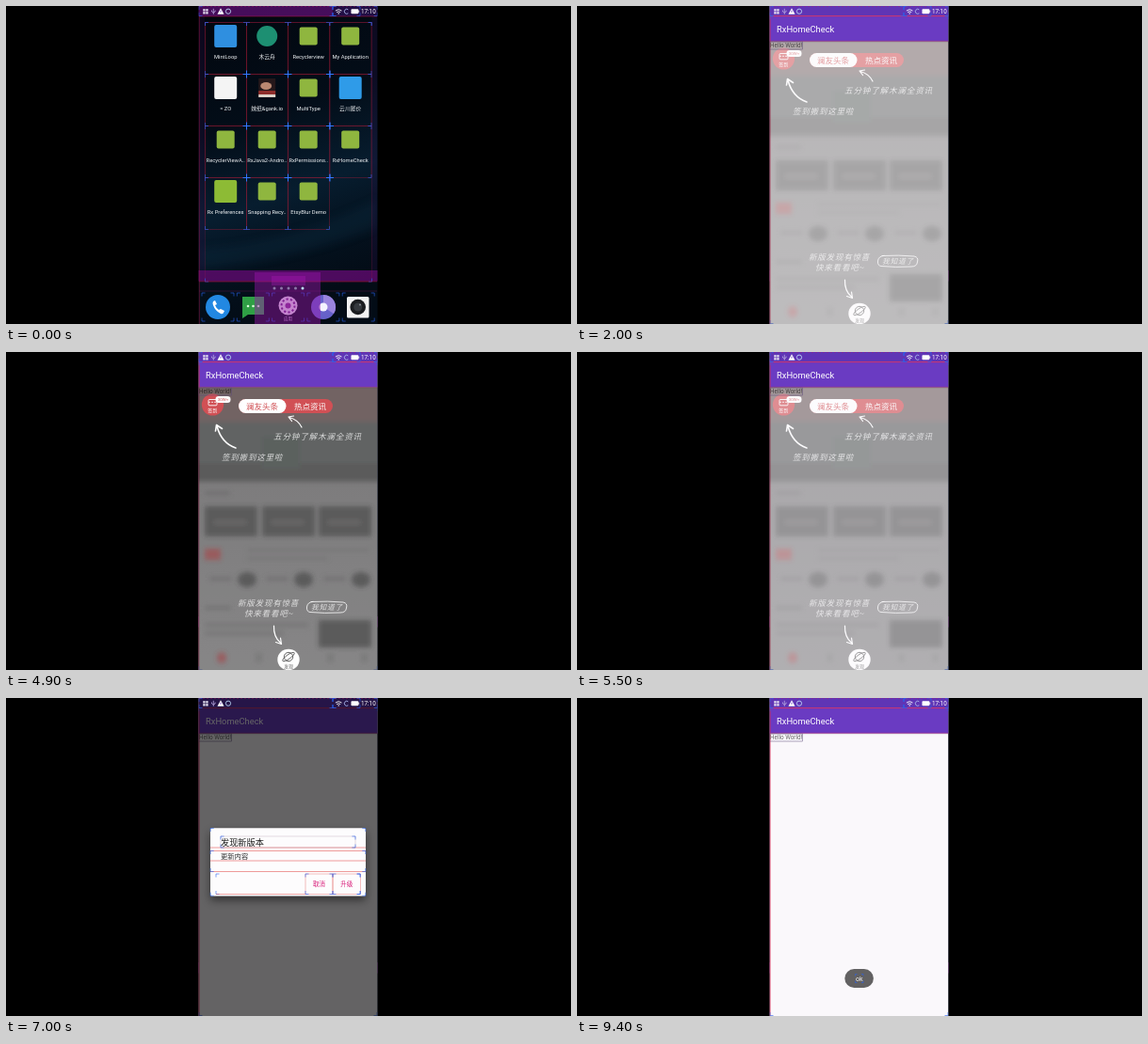
An HTML page that plays this animation: 600 by 338 pixels, repeating every 9500 ms.

```html
<!DOCTYPE html>
<html lang="zh">
<head>
<meta charset="utf-8">
<title>RxHomeCheck</title>
<style>
html, body { margin: 0; width: 100%; height: 100%; overflow: hidden; background: #000; }
svg { display: block; width: 100vw; height: 100vh; }
text { font-family: Roboto, "Noto Sans CJK SC", "Noto Sans CJK", sans-serif; }
.hand text { font-weight: 300; font-style: italic; letter-spacing: .8px; fill: #f2f2f2; opacity: .82; }
.line { fill: none; stroke: #fff; stroke-width: 1.2; stroke-linecap: round; stroke-linejoin: round; }
</style>
</head>
<body>
<svg viewBox="0 0 600 338">
  <defs>
    <linearGradient id="wall" x1="0" y1="0" x2=".2" y2="1">
      <stop offset="0" stop-color="#02060e"/>
      <stop offset=".4" stop-color="#030d18"/>
      <stop offset=".66" stop-color="#071d2f"/>
      <stop offset=".82" stop-color="#04121f"/>
      <stop offset="1" stop-color="#030c16"/>
    </linearGradient>
    <linearGradient id="veil" x1="0" y1="0" x2="0" y2="1">
      <stop offset="0" stop-color="#514f50"/>
      <stop offset=".5" stop-color="#5a595a"/>
      <stop offset="1" stop-color="#636263"/>
    </linearGradient>
    <filter id="soft" x="-20%" y="-20%" width="140%" height="140%"><feGaussianBlur stdDeviation="2.6"/></filter>
    <filter id="shade" x="-20%" y="-30%" width="140%" height="170%"><feGaussianBlur stdDeviation="5"/></filter>
    <clipPath id="phone"><rect x="204.5" width="190" height="338"/></clipPath>
    <clipPath id="body"><rect x="204.5" y="37.5" width="190" height="301"/></clipPath>
  </defs>
  <g clip-path="url(#phone)">
    <g id="home"></g>
    <g id="page"></g>
    <g id="guide" clip-path="url(#body)"></g>
    <g id="hello"></g>
    <g id="dim"></g>
    <g id="dialog"></g>
    <g id="toast"></g>
    <g id="status"></g>
  </g>
</svg>
<script>
const $ = id => document.getElementById(id);
const rect = (x, y, w, h, fill, extra = '') =>
  `<rect x="${x}" y="${y}" width="${w}" height="${h}" fill="${fill}" ${extra}/>`;
const disc = (x, y, r, fill, extra = '') => `<circle cx="${x}" cy="${y}" r="${r}" fill="${fill}" ${extra}/>`;
const oval = (x, y, rx, ry, fill) => `<ellipse cx="${x}" cy="${y}" rx="${rx}" ry="${ry}" fill="${fill}"/>`;
const path = (d, extra = 'class="line"') => `<path d="${d}" ${extra}/>`;
const text = (x, y, size, fill, str, extra = '') =>
  `<text x="${x}" y="${y}" font-size="${size}" fill="${fill}" ${extra}>${str.replace(/&/g, '&amp;')}</text>`;
const mid = 'text-anchor="middle"';

// Blue corner ticks of a layout box
function corners(x, y, w, h, n = 3.5) {
  const r = x + w, b = y + h;
  const d = `M${x} ${y + n}V${y}h${n}M${r - n} ${y}H${r}v${n}M${r} ${b - n}V${b}h${-n}M${x + n} ${b}H${x}v${-n}`;
  return path(d, 'fill="none" stroke="#2a62f0" stroke-width=".7" opacity=".85"');
}
function bounds(x, y, w, h, color = '#d2203f', o = .6) {
  return rect(x, y, w, h, 'none', `stroke="${color}" stroke-width=".6" opacity="${o}"`) + corners(x, y, w, h);
}

function drawHome() {
  const cols = [211.5, 255.5, 299.5, 344], rows = [17.5, 72.5, 127.5, 182.5];
  const bot = '#8fb63f';
  const apps = [
    ['MintLoop', 'sq', '#2f8fe0', 24], ['木云舟', 'ci', '#1d8f72', 22], ['Recyclerview', 'sq', bot, 19], ['My Application', 'sq', bot, 19],
    ['= ZO', 'sq', '#f4f4f4', 24], ['妹纸&gank.io', 'photo'], ['MultiType', 'sq', bot, 19], ['云川屋价', 'sq', '#2f9be8', 24],
    ['RecyclerViewA..', 'sq', bot, 19], ['RxJava2-Andro..', 'sq', bot, 19], ['RxPermissions..', 'sq', bot, 19], ['RxHomeCheck', 'sq', bot, 19],
    ['Rx Preferences', 'sq', '#8dbb35', 24], ['Snapping Recy..', 'sq', bot, 19], ['EtsyBlur Demo', 'sq', bot, 19]
  ];
  let s = rect(204, 0, 191, 338, 'url(#wall)');
  s += path('M204 258Q300 252 395 205V235Q310 270 204 280Z', 'fill="#123f5a" opacity=".22" filter="url(#shade)"');
  s += rect(204, 0, 143, 11, '#58106f', 'opacity=".8"') + rect(347, 0, 48, 11, '#2a1052', 'opacity=".8"');
  s += rect(204, 11, 7, 270, '#3a0a50', 'opacity=".2"') + rect(388.5, 11, 6, 270, '#3a0a50', 'opacity=".2"');
  s += rect(204, 281, 191, 11.5, '#5f0a70', 'opacity=".8"');
  s += bounds(211.5, 17.5, 177, 275.5, '#a01c50', .4);
  s += path('M205 11H394M205 292.8H394M205.2 11V338', 'stroke="#c01850" stroke-width=".7" opacity=".7"');
  s += path('M205 303H394', 'stroke="#8a1c60" stroke-width=".5" opacity=".6"');

  apps.forEach(([name, kind, fill, size], i) => {
    const c = i % 4, x = cols[c], y = rows[i >> 2], cx = x + 21.7, cy = y + 14.5;
    s += bounds(x, y, 44, 55, '#c01c3c', .55);
    if (kind === 'sq') s += rect(cx - size / 2, cy - size / 2, size, size, fill, 'rx="2"');
    else if (kind === 'ci') s += disc(cx, cy, size / 2, fill);
    else s += rect(cx - 9, cy - 10, 18, 20, '#25171a') + oval(cx - 1, cy - 2, 6, 4, '#b98771') +
      rect(cx - 9, cy + 3, 18, 4, '#8e2d2b') + rect(cx - 9, cy + 7, 18, 3, '#ddd2c8');
    s += text(cx, y + 38, 5.8, '#f2f4f6', name, mid);
  });
  for (const x of [255.5, 299.5, 344]) for (const y of [72.5, 127.5, 182.5])
    s += path(`M${x - 4} ${y}h8M${x} ${y - 4}v8`, 'stroke="#3478ff" stroke-width="1"');

  // Dock
  for (let i = 0; i < 5; i++) s += corners(208 + i * 37.3, 305, 34, 30);
  s += disc(225, 320, 13, '#2288e2');
  s += path('M220 314q-1 2 0 4q2 6 8 9q2 1 3-1l1-2-4-2-2 1q-3-2-4-5l2-1-2-4z', 'fill="#fff"');
  s += path('M251 309h23v19h-17l-6 4z', 'fill="#2f9f45"') + [257, 262.5, 268].map(x => disc(x, 319, 1.3, '#d9ffd9')).join('');
  s += disc(299.5, 318.5, 10, '#e6e0ea') + disc(299.5, 318.5, 7, 'none', 'stroke="#6d2b80" stroke-width="2" stroke-dasharray="2.2 2.2"') +
    disc(299.5, 318.5, 3, '#84358f') + text(299.5, 334, 4.5, '#dcb9e6', '应用', mid);
  s += disc(337, 320, 13, '#6661c9') + path('M337 307a13 13 0 0 1 11 20l-11-7z', 'fill="#9a83dd"') + disc(337, 320, 4.5, '#f4f2ff');
  s += rect(362, 309, 23.5, 22.5, '#f2f2f2', 'rx="1.5"') + disc(373.7, 320, 8.3, '#1b1d20') + disc(373.7, 320, 4.5, '#34383d') +
    disc(376, 317.5, 1, '#8c9298');
  // Margin tint over the dock's middle
  s += rect(264, 283, 70, 55, '#9a14aa', 'opacity=".45"') + rect(282, 287, 36, 10, '#b01cb8', 'opacity=".3"');
  for (let i = 0; i < 5; i++) s += disc(285 + i * 7.5, 300, 1.5, i === 4 ? '#bfe8ff' : '#8d78a8');
  $('home').innerHTML = s;
}

function drawPage() {
  $('page').innerHTML = rect(204.5, 0, 190, 338, '#faf8fb') + rect(204.5, 0, 190, 10.5, '#5f35b5') +
    rect(204.5, 10.5, 190, 27, '#6a3bc2') + rect(204.5, 37.5, 190, 1, '#000', 'opacity=".15"') +
    text(212, 27.6, 9.35, '#fff', 'RxHomeCheck') +
    path('M204.5 10.7H394.5M205 10.5V338', 'fill="none" stroke="#dc1f4c" stroke-width=".8"') +
    path('M204.5 37.3H394.5', 'stroke="#a82880" stroke-width=".6"') + corners(205, 10.7, 189, 326.8);
  $('hello').innerHTML = text(205, 44.3, 6.35, '#000', 'Hello World!', 'opacity=".58"') +
    rect(204.8, 38, 34.7, 8, 'none', 'stroke="#5b4a78" stroke-width=".5"');
}

function drawGuide() {
  const red = '#c41c22', dark = '#2a2a2a', faint = '#4f4e4f';
  let b = rect(198, 30, 204, 45, '#4a3436') + rect(198, 74, 204, 64, '#333435') + rect(202, 118, 204, 18, '#292a2b') +
    rect(272, 90, 40, 34, '#2c302e');
  b += rect(211, 148, 27, 4, '#464546');
  for (const x of [211, 272, 332]) b += rect(x, 164, 56, 32, dark) + rect(x + 10, 179, 34, 4, '#3f3e3e');
  b += rect(211, 209, 17, 12, '#7a2a2e') + rect(256, 209, 130, 3, faint) + rect(256, 218, 86, 3, faint);
  for (const x of [256, 316, 377]) b += oval(x, 242, 10, 8, '#2a2a2b') + rect(x - 40, 239, 24, 4, '#484748');
  b += rect(211, 270, 28, 4, '#4a494a') + rect(211, 288, 110, 4, faint) + rect(211, 297, 84, 4, faint) +
    rect(332, 285, 56, 29, dark) + oval(229, 325, 5, 6, '#7a2e32');
  for (const x of [265, 341, 377]) b += rect(x, 320, 7, 10, '#555455');

  let s = rect(204.5, 37.5, 190, 301, 'url(#veil)') + `<g filter="url(#soft)">${b}</g>`;
  s += disc(219.5, 56, 11.6, red) + rect(215, 50.5, 9, 6.3, 'none', 'rx="1" stroke="#fff" stroke-width=".9"') +
    path('M215 53.3h9', 'stroke="#fff" stroke-width=".8" stroke-dasharray="2 1"') +
    text(219.3, 63.8, 5, '#fff', '签到', mid) +
    rect(222.5, 47, 16, 7, '#fff', 'rx="3.3"') + text(230.5, 52.2, 4.4, red, '30W+', mid);
  s += rect(247, 50, 100, 15, red, 'rx="7.5"') + rect(247, 50, 50.5, 15, '#fff', 'rx="7.5"') +
    text(272, 60.8, 8.5, red, '澜友头条', mid) + text(323, 60.8, 8.5, '#fff', '热点资讯', mid);
  s += path('M244 102Q229 97 224 79M222.5 84L223.5 77.5L229.5 81.5', 'class="line" style="stroke-width:1.6"') +
    path('M314 80Q310 72 301 69.5M303.5 73.5L300 69L305.5 68') +
    path('M284.5 291Q284 303 291.5 309M286.5 308.5L292.5 310.5L291.5 304');
  s += '<g class="hand">' + text(284, 92.5, 8.6, '', '五分钟了解木澜全资讯') + text(229, 114.5, 8.5, '', '签到搬到这里啦') +
    text(246, 269.5, 8.5, '', '新版发现有惊喜') + text(253, 280.5, 8.5, '', '快来看看吧~') +
    text(324, 274.3, 7.7, '', '我知道了') + '</g>';
  s += path('M324 265.5Q342 264.5 358 266Q363 267 361.5 272Q361 277 355 277Q338 278 323 276.5Q319 276 319.5 271Q320 266 326 265.3', 'class="line" style="stroke-width:.8"');
  s += oval(300, 327, 11.7, 11.2, '#fff') + disc(300, 324, 4.7, 'none', 'stroke="#333" stroke-width="1"') +
    `<ellipse cx="300" cy="324" rx="7.5" ry="2.2" fill="none" stroke="#333" stroke-width=".9" transform="rotate(-35 300 324)"/>` +
    text(300, 335.6, 5, '#444', '发现', mid);
  $('guide').innerHTML = s;
}

function drawDialog() {
  const pink = '#d81b78';
  const rule = y => path(`M217 ${y}H382`, 'stroke="#e2504e" stroke-width=".7" opacity=".8"');
  $('dim').innerHTML = rect(204, 0, 191, 338, '#000', 'opacity=".6"');
  $('dialog').innerHTML = rect(217, 143, 165, 72, '#000', 'opacity=".5" filter="url(#shade)"') +
    rect(217, 138.3, 165, 72.2, '#fdfcfd', 'rx="1.5"') + [159, 162.5, 173, 184.5].map(rule).join('') +
    corners(217.2, 138.5, 164.6, 71.7) + corners(217.2, 162.5, 164.6, 22) +
    rect(228, 147, 143, 12, 'none', 'stroke="#b9a5b4" stroke-width=".4"') + corners(228, 147, 143, 12) +
    bounds(318, 187, 29, 21.5, '#e2504e') + bounds(347, 187, 29.3, 21.5, '#e2504e') + corners(223, 187, 153, 21.5) +
    path('M223 208.5H318', 'stroke="#e2504e" stroke-width=".5"') +
    text(228, 156.5, 9.2, '#1c1c1c', '发现新版本', 'font-weight="500"') + text(228, 170.6, 7.3, '#2c2c2c', '更新内容') +
    text(332.5, 200.3, 6.5, pink, '取消', mid) + text(361.7, 200.3, 6.5, pink, '升级', mid);
  $('toast').innerHTML = rect(284.3, 288, 30.6, 20, '#626162', 'rx="10"') + corners(295.5, 293.5, 8.5, 9, 2) +
    text(299.7, 300.8, 7, '#f4f4f4', 'ok', mid);
}

function drawStatus() {
  let s = '';
  for (const x of [209.3, 212.3]) for (const y of [3.2, 6.2]) s += rect(x, y, 2.3, 2.3, '#e8e4f2');
  s += path('M220.3 2.8V8.8M218.5 4.6v1.4l1.8 1.2l1.8-1.2V4.6', 'fill="none" stroke="#b9a9e0" stroke-width=".8"');
  s += path('M228 2.3L231.5 8.8H224.5Z', 'fill="#fff"') + rect(227.6, 4.6, .8, 2.2, '#6a3bc2');
  s += disc(236, 5.7, 2.6, 'none', 'stroke="#b9d4f4" stroke-width=".9"');
  s += path('M350.2 4.8Q353.2 2.2 356.2 4.8M351.5 6.4Q353.2 5 354.9 6.4', 'class="line" style="stroke-width:.9"') + disc(353.2, 8, .7, '#fff');
  s += path('M363.3 3.8A2.5 2.5 0 1 0 363.3 7.8', 'fill="none" stroke="#a9b4ea" stroke-width=".9"');
  s += rect(366.5, 3.2, 7.8, 5, '#fff', 'rx=".8"') + rect(374.3, 4.6, .9, 2.2, '#fff');
  s += text(377, 8.2, 6.3, '#fff', '17:10');
  s += corners(205, .5, 142, 10) + corners(347, .5, 47.3, 10) + corners(347, .5, 29, 10);
  s += path('M205 .5H394', 'stroke="#c51d58" stroke-width=".5" stroke-dasharray="2 2" opacity=".6"');
  $('status').innerHTML = s;
}

drawHome(); drawPage(); drawGuide(); drawDialog(); drawStatus();

// Opacity tracks: [ms, value] pairs, linear in between
const LOOP = 9500, STEP = 100;
const tracks = {
  page: [[800, 0], [1100, 1]],
  hello: [[800, 0], [1100, 1]],
  guide: [[1200, 0], [3200, 1], [4400, 1], [6399, .06], [6400, 0]],
  dim: [[6600, 0], [7000, 1], [8400, 1], [8700, 0]],
  dialog: [[6600, 0], [6900, 1], [8400, 1], [8600, 0]],
  toast: [[8500, 0], [8900, 1]]
};
function valueAt(keys, t) {
  if (t <= keys[0][0]) return keys[0][1];
  for (let i = 1; i < keys.length; i++) {
    const [a, u] = keys[i - 1], [b, v] = keys[i];
    if (t <= b) return u + (v - u) * (t - a) / (b - a);
  }
  return keys[keys.length - 1][1];
}
function frame(now) {
  const t = Math.floor((now % LOOP) / STEP) * STEP;
  for (const id in tracks) $(id).style.opacity = valueAt(tracks[id], t);
  const rise = 14 * (1 - valueAt(tracks.page, t)) ** 2;
  for (const id of ['page', 'hello']) $(id).setAttribute('transform', `translate(0 ${rise})`);
  requestAnimationFrame(() => frame(performance.now()));
}
frame(performance.now());
</script>
</body>
</html>
```
